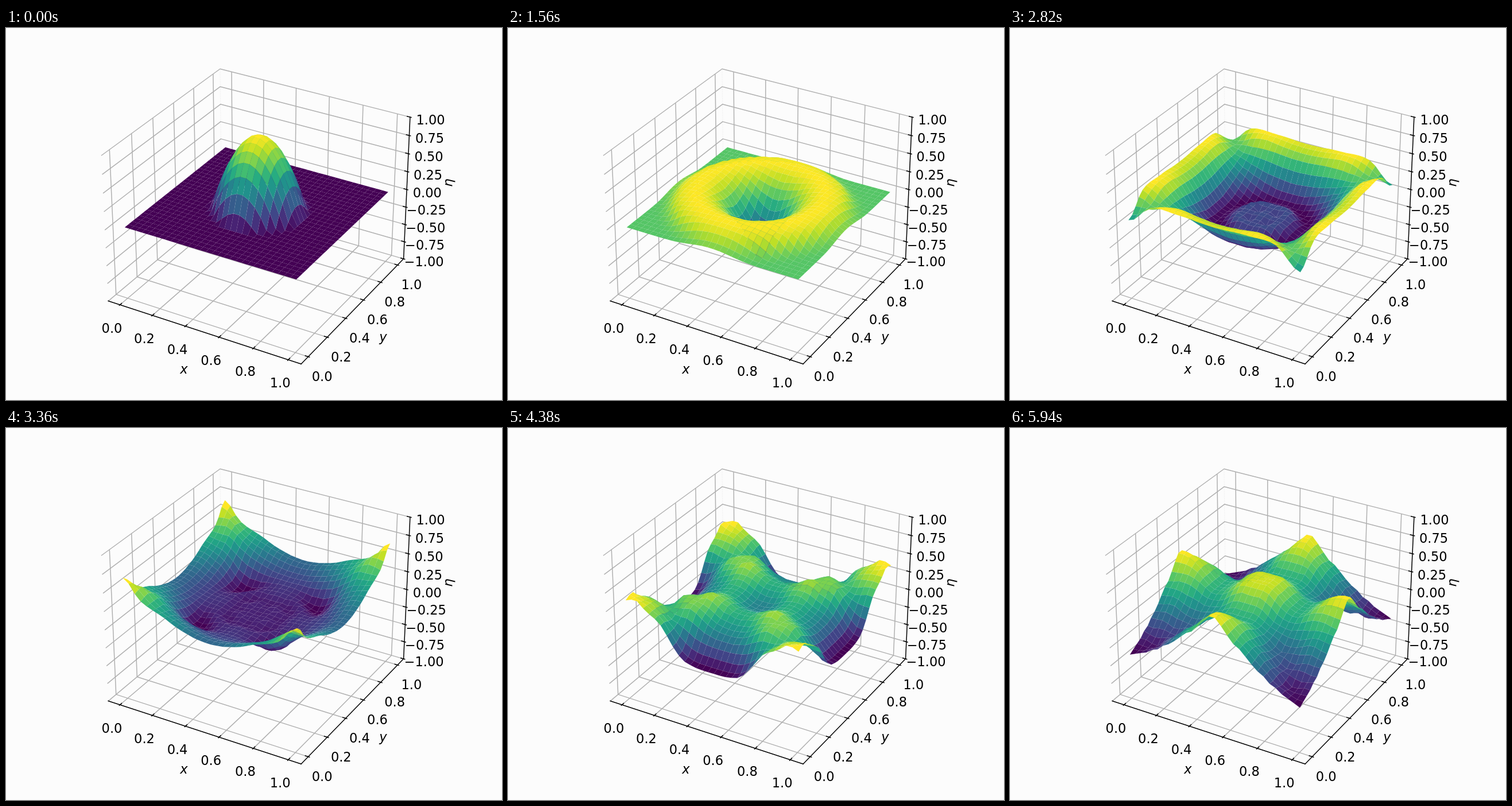
An HTML page with a canvas for the animation above (6000 ms loop, 864 by 648 pixels).

```html
<!DOCTYPE html>
<html>
<head>
<meta charset="utf-8">
<style>
  html, body { margin: 0; width: 100%; height: 100%; overflow: hidden; background: #fcfcfc; }
  canvas { display: block; }
</style>
</head>
<body>
<canvas id="stage" width="864" height="648"></canvas>
<script>
const ctx = document.getElementById('stage').getContext('2d');
const FRAMES = 100, FRAME_MS = 60;
const CELLS = 29, NODES = CELLS + 1;
const LO = -0.0729167, HI = 1.0729167;   // x and y limits of the box
const TICK = (HI - LO) / 120;
const VIRIDIS = [
  [68, 1, 84], [72, 36, 117], [65, 68, 135], [53, 95, 141], [42, 120, 142], [33, 145, 140],
  [34, 168, 132], [68, 191, 112], [122, 209, 81], [189, 223, 38], [253, 231, 37]
];

// Perspective view from elevation 30, azimuth -60; returns [screen x, screen y, nearness].
function project(x, y, z) {
  const a = (x - 0.5) * 1.038961, b = (y - 0.5) * 1.038961, c = z * 0.446429;
  const near = 0.433013 * a - 0.75 * b + 0.5 * c;
  const k = 3233 / (10 - near);
  return [
    440.1 + k * (0.866025 * a + 0.5 * b),
    315.9 - k * (-0.25 * a + 0.433013 * b + 0.866025 * c),
    near
  ];
}

function colour(v) {
  const p = Math.min(Math.max(v, 0), 1) * 10, i = Math.min(Math.floor(p), 9);
  return `rgb(${VIRIDIS[i].map((c, n) => Math.round(c + (VIRIDIS[i + 1][n] - c) * (p - i)))})`;
}

function trace(points) {
  ctx.beginPath();
  points.forEach(([x, y]) => ctx.lineTo(x, y));
}

function line(style, ...points) {
  ctx.strokeStyle = style;
  trace(points.map(p => project(...p)));
  ctx.stroke();
}

function label(text, x, y) {
  ctx.fillText(text, x, y);
}

// Wave equation with reflecting walls, started from a parabolic cap at rest.
function simulate() {
  const courant2 = (0.01 * CELLS) ** 2;
  const mirror = i => i < 0 ? -i : i > CELLS ? 2 * CELLS - i : i;
  const grid = f => Array.from({ length: NODES }, (_, i) => Array.from({ length: NODES }, (_, j) => f(i, j)));
  const start = grid((i, j) => Math.max(0, 1 - 16 * ((i / CELLS - 0.5) ** 2 + (j / CELLS - 0.5) ** 2)));
  const states = [start];
  for (let n = 1; n < FRAMES; n++) {
    const u = states[n - 1], old = states[n - 2];
    states.push(grid((i, j) => {
      const push = courant2 * (u[mirror(i - 1)][j] + u[mirror(i + 1)][j]
        + u[i][mirror(j - 1)] + u[i][mirror(j + 1)] - 4 * u[i][j]);
      return old ? 2 * u[i][j] - old[i][j] + push : u[i][j] + push / 2;
    }));
  }
  return states;
}

function drawAxes() {
  const fifths = [0, 1, 2, 3, 4, 5].map(i => i / 5);
  const heights = [-4, -3, -2, -1, 0, 1, 2, 3, 4].map(i => i / 4);
  const grey = '#b0b0b0', black = '#000';

  ctx.lineWidth = 1;
  ctx.setLineDash([1, 2]);
  line('#e6e6e6', [LO, HI, 1], [LO, HI, -1]);
  ctx.setLineDash([]);

  ctx.lineWidth = 1.5;
  ctx.lineJoin = 'round';
  for (const v of fifths) {
    line(grey, [v, LO, -1], [v, HI, -1], [v, HI, 1]);
    line(grey, [HI, v, -1], [LO, v, -1], [LO, v, 1]);
  }
  for (const z of heights) line(grey, [LO, LO, z], [LO, HI, z], [HI, HI, z]);

  ctx.lineCap = 'square';
  line(black, [LO, LO, -1], [HI, LO, -1]);
  line(black, [HI, LO, -1], [HI, HI, -1]);
  line(black, [HI, HI, -1], [HI, HI, 1]);
  ctx.lineCap = 'butt';

  ctx.fillStyle = black;
  ctx.font = '22.5px "DejaVu Sans", sans-serif';
  ctx.textAlign = 'center';
  for (const v of fifths) {
    line(black, [v, LO - TICK, -1], [v, LO + 2 * TICK, -1]);
    line(black, [HI + TICK, v, -1], [HI - 2 * TICK, v, -1]);
    const [ax, ay] = project(v, LO, -1), [bx, by] = project(HI, v, -1);
    label(v.toFixed(1), ax - 14, ay + 48.4);
    label(v.toFixed(1), bx + 24.2, by + 42.5);
  }
  for (const z of heights) {
    line(black, [HI + TICK, HI, z], [HI - 2 * TICK, HI, z]);
    const [x, y] = project(HI, HI, z);
    label(z.toFixed(2).replace('-', '\u2212'), x + 35.6, y + 13.2);
  }

  ctx.font = 'italic 22.5px "DejaVu Sans", sans-serif';
  label('x', 310, 602);
  label('y', 657, 546);
  ctx.save();
  ctx.translate(777.5, 270);
  ctx.rotate(-87.4 * Math.PI / 180);
  label('η', 0, 0);
  ctx.restore();
}

function drawSurface(u) {
  const nodes = u.map((row, i) => row.map((z, j) => project(i / CELLS, j / CELLS, z)));
  const quads = [];
  for (let i = 0; i < CELLS; i++) {
    for (let j = 0; j < CELLS; j++) {
      const ring = [[i, j], [i + 1, j], [i + 1, j + 1], [i, j + 1]];
      const points = ring.map(([a, b]) => nodes[a][b]);
      quads.push({
        points,
        height: ring.reduce((sum, [a, b]) => sum + u[a][b], 0) / 4,
        near: points.reduce((sum, p) => sum + p[2], 0)
      });
    }
  }
  const heights = quads.map(q => q.height);
  const low = Math.min(...heights), span = Math.max(...heights) - low;
  quads.sort((p, q) => p.near - q.near);
  for (const q of quads) {
    ctx.fillStyle = colour((q.height - low) / span);
    trace(q.points);
    ctx.fill();
  }
}

const states = simulate();
let shown = -1;

function tick() {
  const frame = Math.floor(performance.now() / FRAME_MS) % FRAMES;
  if (frame !== shown) {
    shown = frame;
    ctx.fillStyle = '#fcfcfc';
    ctx.fillRect(0, 0, 864, 648);
    drawAxes();
    drawSurface(states[frame]);
  }
  requestAnimationFrame(tick);
}
tick();
</script>
</body>
</html>
```
